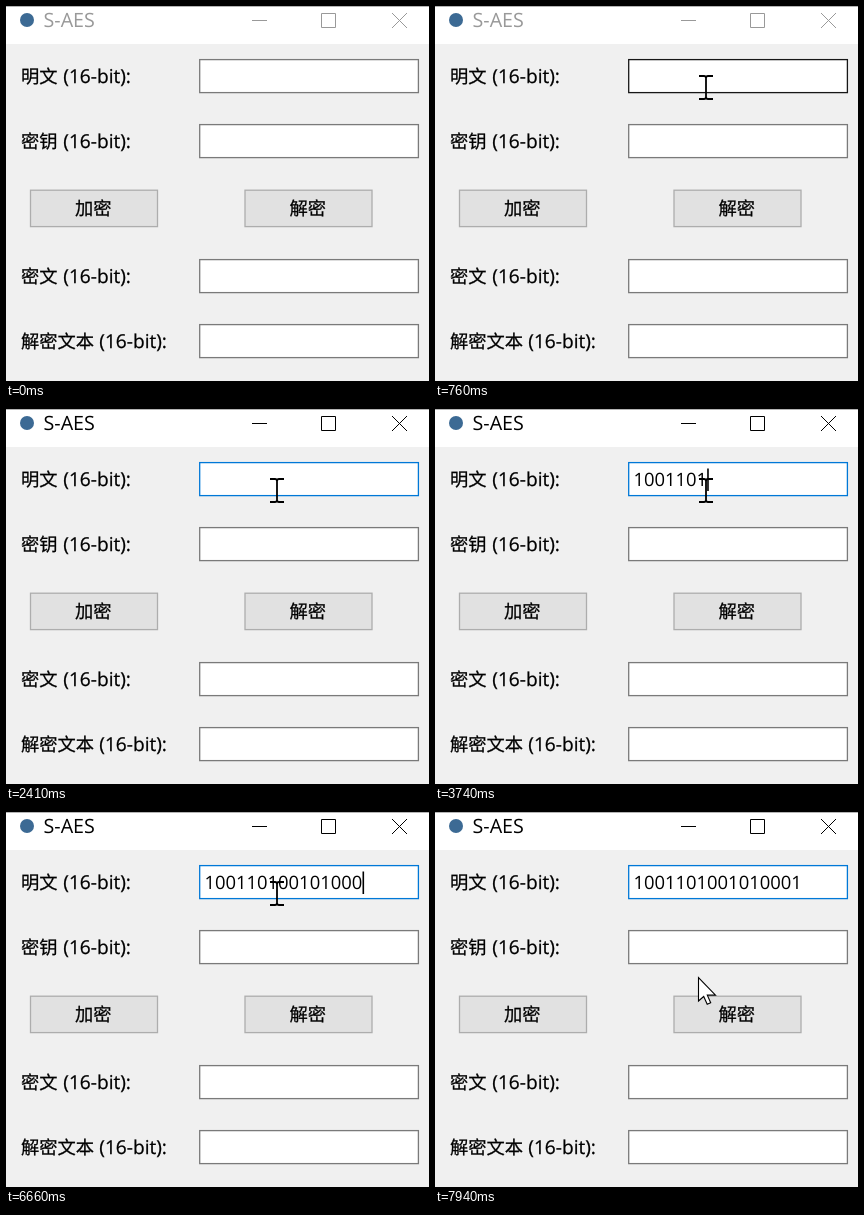
Animation of 423 by 375 pixels, one loop 8000 ms. Source, as an HTML page:

```html
<!DOCTYPE html>
<html lang="zh-CN">
<head>
<meta charset="utf-8">
<title>S-AES</title>
<style>
html, body { margin: 0; width: 100%; height: 100%; overflow: hidden; background: #f0f0f0; }
svg { display: block; }
text { font-family: "Open Sans", "Noto Sans CJK SC", "Noto Sans CJK", sans-serif; text-rendering: geometricPrecision; white-space: pre; }
.label { stroke: #000; stroke-width: 0.25; }
</style>
</head>
<body>
<svg id="stage" width="423" height="375" viewBox="0 0 423 375"></svg>
<script>
const stage = document.getElementById("stage");

function add(tag, attrs, text = "") {
  const el = document.createElementNS("http://www.w3.org/2000/svg", tag);
  for (const key in attrs) el.setAttribute(key, attrs[key]);
  el.textContent = text;
  stage.append(el);
  return el;
}
const rect = (x, y, width, height, fill, stroke = "none") =>
  add("rect", { x, y, width, height, fill, stroke, "stroke-width": 1.3 });
const write = (x, y, size, text) => add("text", { x, y, "font-size": size, fill: "#000" }, text);
const label = (...args) => write(...args).setAttribute("class", "label");
const show = (el, on) => el.setAttribute("visibility", on ? "visible" : "hidden");

// Title bar
rect(0, 0, 423, 38, "#fff");
rect(0, 0, 423, 1, "#b4b4b4");
add("circle", { cx: 21, cy: 14, r: 7, fill: "#3c6a94" });
const title = write(37.5, 21, 19.7, "S-AES");
const controls = add("path", {
  d: "M246 14.5H261M315.5 7.5H329.5V21.5H315.5ZM386 7L401 22M401 7L386 22",
  fill: "none"
});

// Form
const fields = [["明文", 53], ["密钥", 118], ["密文", 253], ["解密文本", 318]].map(([name, top]) => {
  label(15, top + 24, 18.3, name);
  label(21.3 + 18 * name.length, top + 24, 19.1, "(16-bit):");
  const x = 193.7, y = top + 0.6, w = 218.7, h = 33;
  return { x, y, w, h, el: rect(x, y, w, h, "#fff", "#7a7a7a") };
});
const buttons = [["加密", 24.5], ["解密", 239]].map(([name, x]) => {
  const y = 184.2, w = 127, h = 36.4;
  const el = rect(x, y, w, h, "#e1e1e1", "#adadad");
  label(x + 44.5, 209, 18.3, name);
  return { x, y, w, h, el };
});

const digits = "1001101001010001", advance = 10.54;
const typed = write(198.4, 77, advance / 0.572, "");
const caret = rect(0, 59.5, 1.6, 22.5, "#000");
const beam = add("path", {
  d: "M-7-12H-2Q0-12 0-10Q0-12 2-12H7M0-10V9M-7 11H-2Q0 11 0 9Q0 11 2 11H7",
  fill: "none", stroke: "#000", "stroke-width": 1.8
});
const arrow = add("path", {
  d: "M0 0V23.5L5.2 19L8.7 26.7L12.2 25.2L8.8 17.6H17Z",
  fill: "#fff", stroke: "#000", "stroke-width": 1.1
});

const keyTimes = [2610, 2810, 3010, 3210, 3340, 3540, 3740, 4140,
  5270, 5470, 5670, 5800, 6330, 6460, 6660, 6930];
const blinkTimes = [960, 1550, 1810, 2410, 2680, 3340, 3600, 4210,
  4540, 5140, 5470, 6070, 6330, 6930, 7260, 7860];
const passed = (times, t) => times.filter(time => time <= t).length;

function pointer(t) {
  if (t < 130) return [-99, -99];
  if (t < 7460) {
    const p = Math.min(9, Math.floor((t - 130) / 70)) / 9;
    const e = p * p * (3 - 2 * p);
    return [299 - 28 * e, 336 - 254 * e];
  }
  const p = Math.min(7, Math.floor((t - 7460) / 80) + 1) / 7;
  return [271 - 7.5 * p, 82 + 83.5 * p + 150 * p * (1 - p)];
}

function draw(t) {
  const [x, y] = pointer(t);
  const over = b => x >= b.x && x <= b.x + b.w && y >= b.y && y <= b.y + b.h;
  const active = t >= 960;
  const count = passed(keyTimes, t);

  title.setAttribute("fill", active ? "#000" : "#999");
  controls.setAttribute("stroke", active ? "#000" : "#999");
  fields.forEach((f, i) => f.el.setAttribute("stroke",
    active && i === 0 ? "#0078d7" : over(f) ? "#171717" : "#7a7a7a"));
  buttons.forEach(b => {
    b.el.setAttribute("fill", over(b) ? "#e5f1fb" : "#e1e1e1");
    b.el.setAttribute("stroke", over(b) ? "#0078d7" : "#adadad");
  });

  typed.textContent = digits.slice(0, count);
  caret.setAttribute("x", 198.4 + advance * count);
  show(caret, passed(blinkTimes, t) % 2);

  const inField = fields.some(over);
  show(beam, inField);
  show(arrow, !inField);
  for (const el of [beam, arrow]) el.setAttribute("transform", `translate(${x} ${y})`);
}

function tick() {
  draw(performance.now() % 8000);
  requestAnimationFrame(tick);
}
tick();
</script>
</body>
</html>
```
